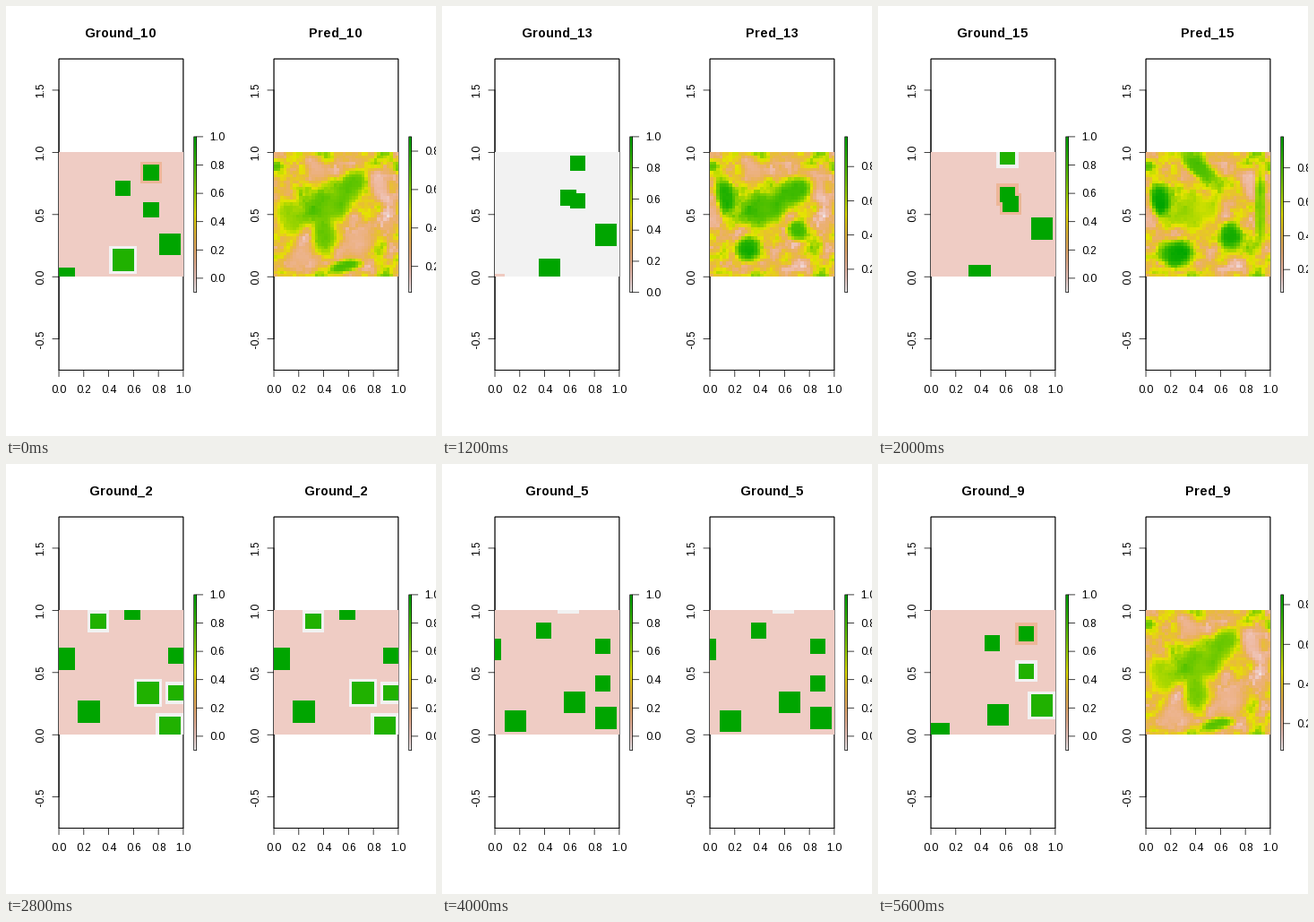
A matplotlib script for the animation above (6000 ms loop, 480x480 px).

```python
import math
import numpy as np
import matplotlib.pyplot as plt
from matplotlib.animation import FuncAnimation
from matplotlib.colors import ListedColormap, hsv_to_rgb
from matplotlib.patches import Rectangle

plt.rcParams["text.hinting_factor"] = 1  # whole-pixel glyph advances

SIZE, CELLS, PIXELS = 480, 40, 139
LEFT, RIGHT, TOP, BOTTOM = 59.04, 197.9, 59.04, 406.56
SIDE = RIGHT - LEFT
MID = (TOP + BOTTOM) / 2
BAR_X, BAR_W, BAR_TOP, BAR_BOTTOM = 209.7, 2.9, 145.92, 319.68
STEPS = [*range(10, 16), *range(1, 10)]

# name: x, y at step 0, velocity, side (in cells, y downwards)
BOXES = {
    "A": (8, -1, 1, 1, 5), "B": (21, 0, 0, -1, 5),
    "C": (0, 14, -1, -1, 7), "D": (37, 14, -1, -1, 5),
    "E": (27, 21, -1, 1, 7), "F": (37, 26, -1, -1, 5),
    "G": (8, 27, -1, 1, 7), "H": (32, 36, 0, -1, 7),
}
# Boxes with a rim below or above the background; low rims otherwise rotate
LOW = {2: "AEFH", 4: "BG", 7: "C", 9: "FH", 10: "E", 13: "", 15: "D"}
HIGH = {4: "DFH", 7: "F", 9: "D", 10: "D", 13: "G", 15: "AF"}

# Blobs: x, y, radius x, radius y, tilt in degrees, value
POCKETS = [(34, 11, 3.5, 6, -20, .15), (14, 6, 5, 2.5, 45, .22), (1, 20, 2, 5, 0, .2)]
STAGES = {
    10: [(27, 29, 7, 5, -35, .24), (8, 34, 6, 4, -30, .24), (5, 21, 5, 7, -20, .62),
         (18, 17, 10, 6.5, -15, .76), (25, 10, 6, 4, -45, .74),
         (16, 27, 4, 6, 0, .74), (23, 36.5, 6, 2, -10, .82)],
    13: [(18, 18, 9, 6, -15, .83), (27, 13, 7, 4, -35, .83), (5, 14, 3, 6, -15, .93),
         (12, 31, 4.5, 4.5, 0, .95), (28, 25, 3.5, 3.5, 0, .86)],
    15: [(16, 19, 10, 6, -10, .6), (17, 5, 8, 3, 35, .82), (4.5, 15, 3.4, 5.4, -10, 1),
         (10, 32.5, 5.5, 5, -15, 1), (27, 27, 4, 5, 0, .97), (36.5, 18, 1.8, 14, 0, .74)],
}


def terrain(n=255):
    half = n // 2
    a, b = np.linspace(0, 1, half), np.linspace(0, 1, n - half + 1)[1:]
    green = np.c_[(2 - a) / 6, np.ones(half), .65 + .25 * a]
    pale = np.c_[(1 - b) / 6, 1 - b, .9 + .05 * b]
    return ListedColormap(hsv_to_rgb(np.r_[green, pale])[::-1])


def smooth_noise(rng, passes=4):
    z = rng.normal(size=(CELLS, CELLS))
    for _ in range(passes):
        for axis in (0, 1):
            z = (np.roll(z, 1, axis) + 2 * z + np.roll(z, -1, axis)) / 4
    return z / z.std()


CMAP = terrain()
RNG = np.random.default_rng(8)
TEXTURE = .13 * smooth_noise(RNG) + .04 * smooth_noise(RNG, 0)
GY, GX = np.mgrid[:CELLS, :CELLS] + .5


def blob_field(blobs):
    z = .4 + TEXTURE
    for x, y, rx, ry, tilt, value in blobs:
        c, s = math.cos(math.radians(tilt)), math.sin(math.radians(tilt))
        u = ((GX - x) * c + (GY - y) * s) / rx
        v = ((GY - y) * c - (GX - x) * s) / ry
        z += (value + .15 * TEXTURE - z) * np.exp(-(u * u + v * v) ** 2)
    return np.clip(z, 0, 1)


FIELDS = [blob_field(POCKETS + blobs) for blobs in STAGES.values()]


def prediction(step):
    weights = [np.interp(step, list(STAGES), row) for row in np.eye(3)]
    z = sum(w * f for w, f in zip(weights, FIELDS))
    z = z * (1 - .04 * max(0, 10 - step))
    lo = .065
    hi = np.interp(step, [8, 9, 10, 13, 15], [.73, .85, .875, .974, .984])
    return lo + z * (hi - lo), lo, hi


def ground(step):
    z = np.zeros((CELLS, CELLS))
    low = LOW.get(step, "ABCDEFGH"[(step + 4) % 8])

    def fill(name, pad, value):
        x, y, dx, dy, side = BOXES[name]
        x, y = x + dx * step - pad, y + dy * step - pad
        side += 2 * pad
        z[max(y, 0):max(y + side, 0), max(x, 0):max(x + side, 0)] = value

    for name in HIGH.get(step, ""):
        fill(name, 1, .1)
    for name in low:
        fill(name, 1, -.1)
    for name in BOXES:
        fill(name, 0, .9 if name in low else 1)
    return z, (-.1 if low else 0), 1


fig = plt.figure(figsize=(SIZE / 72, SIZE / 72), dpi=72, facecolor="white")
ax = fig.add_axes([0, 0, 1, 1])


def line(x, y):
    ax.plot(x, y, color="black", lw=.75, snap=False, solid_capstyle="round")


def frame(x, y, w, h):
    ax.add_patch(Rectangle((x, y), w, h, fill=False, ec="black", lw=.75,
                           snap=False, zorder=3))


def label(x, y, text, **style):
    style = {"size": 12, "ha": "center", "va": "baseline", **style}
    ax.text(x, y, text, family="Liberation Sans", rotation_mode="anchor", **style)


def picture(z, x, y, w, h, lo, hi, zorder):
    ax.imshow(z, cmap=CMAP, vmin=lo, vmax=hi, extent=(x, x + w, y + h, y),
              interpolation="nearest", aspect="auto", zorder=zorder)


def colorbar(x, lo, hi):
    height = BAR_BOTTOM - BAR_TOP
    picture(np.linspace(hi, lo, 174)[:, None], round(x), round(BAR_TOP),
            3, 174, lo, hi, 1)
    frame(x, BAR_TOP, BAR_W, height)
    step = .1 if hi - lo < .7 else .2
    edge = x + BAR_W
    first, last = math.ceil(lo / step - 1e-6), math.floor(hi / step + 1e-6)
    for k in range(first, last + 1):
        y = BAR_BOTTOM - (k * step - lo) / (hi - lo) * height
        line([edge, edge + 7.2], [y, y])
        label(edge + 14.4, y + 4.3, f"{k * step:.1f}", ha="left")


def panel(dx, title, z, lo, hi):
    left, right = LEFT + dx, RIGHT + dx
    cell = np.arange(PIXELS) * CELLS // PIXELS
    picture(z[np.ix_(cell, cell)], int(left), int(MID - SIDE / 2),
            PIXELS, PIXELS, lo, hi, 4)
    for _ in range(2):
        frame(left, TOP, SIDE, BOTTOM - TOP)
    line([left, right], [BOTTOM, BOTTOM])
    line([left, left], [MID - SIDE, MID + SIDE])
    for k in range(6):
        x = left + k * SIDE / 5
        line([x, x], [BOTTOM, BOTTOM + 7.2])
        label(x, 432.2, f"{k / 5:.1f}")
    for k in range(-1, 4):
        y = MID - (k - 1) * SIDE / 2
        line([left - 7.2, left], [y, y])
        label(left - 17, y, f"{k / 2:.1f}", rotation=90)
    label((left + right) / 2, 35, title, size=14.4, weight="bold")
    colorbar(BAR_X + dx, lo, hi)


def draw(index):
    step = STEPS[index]
    ax.clear()
    ax.axis("off")
    truth = ground(step)
    panel(0, f"Ground_{step}", *truth)
    if step < 8:
        panel(240, f"Ground_{step}", *truth)
    else:
        panel(240, f"Pred_{step}", *prediction(step))
    ax.set(xlim=(0, SIZE), ylim=(SIZE, 0))
    return []


anim = FuncAnimation(fig, draw, frames=len(STEPS), init_func=lambda: [],
                     interval=400, repeat=True, repeat_delay=0)
plt.show()
```
